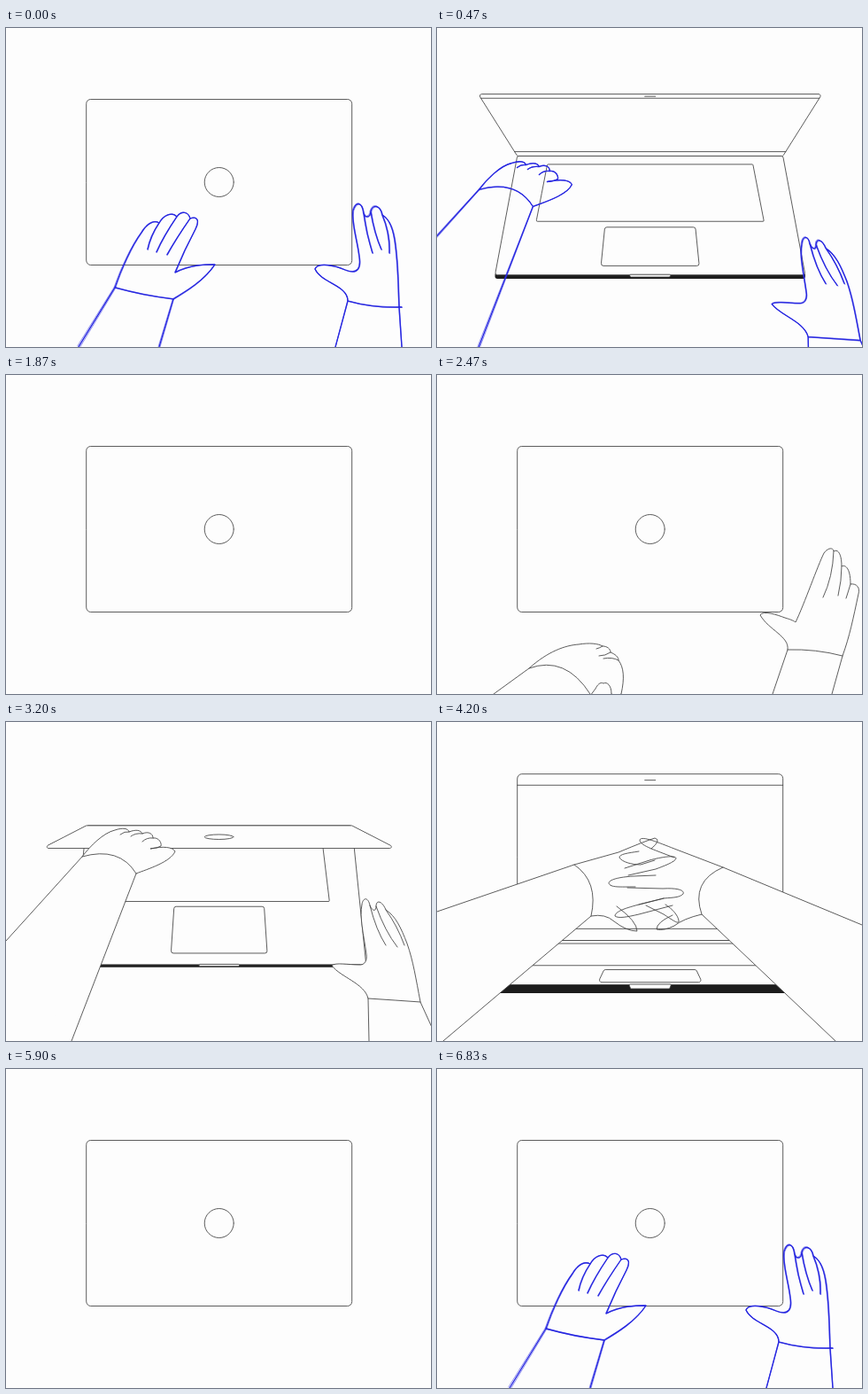
An HTML page with a canvas for the animation above (6860 ms loop, 480x360 px).

```html
<!DOCTYPE html>
<html lang="en">
<head>
<meta charset="utf-8">
<title>Opening a laptop</title>
<style>
  html, body { margin: 0; width: 100%; height: 100%; overflow: hidden; background: #fdfdfd; }
  canvas { display: block; }
</style>
</head>
<body>
<canvas id="stage" width="480" height="360"></canvas>
<script>
const ctx = document.getElementById('stage').getContext('2d');
const LOOP = 6860, CX = 240.7;
const PAPER = '#fdfdfd', LINE = '#404040', BLUE = '#2626e0', PINK = '#f81cf0', PURPLE = '#8a22ba';

// Poses in one group share the same path commands, so their numbers can be blended.
const LEFT = {
  flat: 'M82 360 L123 293 C130 272 142 246 153 231 C160 219 168 217 173 220 C178 211 188 207 193 213 C198 206 206 207 208 215 C216 212 219 217 214 227 L202 251 L191 276 C208 267 225 267 236 267 C224 285 204 297 189 306 L173 360 M173 220 Q163 235 160 250 M193 213 Q178 235 170 253 M208 215 Q192 238 182 256 M123 293 Q155 302 189 306',
  curled: 'M64 360 L104 331 C125 312 145 305 160 304 C172 302 182 303 187 306 C192 306 196 309 196 313 C201 315 205 318 205 322 C211 330 212 342 208 360 L203 362 L197 360 C197 350 192 346 188 348 C184 346 181 350 179 354 L173 362 M187 306 Q184 308 180 309 M196 313 Q190 317 183 317 M205 322 Q198 318 188 320 M104 331 Q145 316 173 360',
  grip: 'M0 247 L86 152 C95 140 110 125 123 122 C132 119 138 120 139 124 C147 121 152 122 154 126 C161 123 166 126 166 131 C173 130 176 137 175 140 L170 142 L163 143 C178 140 188 141 191 146 C186 158 160 166 147 171 L74 360 M139 124 Q134 123 129 127 M154 126 Q146 125 141 129 M166 131 Q159 130 154 135 M86 152 Q128 140 147 171',
  type: 'M0 346 L96 279 C112 264 128 252 138 246 C145 239 155 235 160 237 C165 234 170 233 173 235 C178 232 184 233 186 236 C200 238 207 258 204 264 C200 267 190 262 187 251 L173 283 C182 275 200 274 207 279 C198 298 165 308 146 320 L124 360 M160 237 Q150 243 146 250 M173 235 Q162 243 156 252 M186 236 Q174 246 168 254 M96 279 Q120 300 146 320'
};
const RIGHT = {
  flat: 'M372 360 L386 308 C386 290 356 288 349 272 C352 264 372 268 383 273 C398 279 401 270 399 258 C397 240 390 220 392 206 C395 196 402 195 404 209 C406 215 411 214 412 207 C414 198 423 200 425 211 C434 216 438 228 440 246 C443 270 443 290 444 315 L447 360 M404 209 Q407 232 414 254 M412 207 Q416 232 424 250 M425 211 Q434 232 433 254 M386 308 Q414 316 447 315',
  spread: 'M379 360 L396 310 C398 295 375 288 365 271 C368 265 385 271 393 274 C400 276 404 278 405 279 C415 258 430 215 437 201 C442 194 448 195 448 199 C453 196 457 202 457 216 C460 214 467 216 467 236 C474 235 478 240 476 247 C470 275 466 295 458 317 L446 360 M448 199 Q447 228 436 251 M457 216 Q457 232 453 249 M467 236 Q464 246 462 252 M396 310 Q428 309 458 317',
  grip: 'M410 360 L409 312 C405 295 378 288 368 275 C371 271 388 274 398 274 C406 275 408 268 407 262 C404 240 399 220 402 206 C403 198 409 197 411 207 C414 214 418 214 418 208 C418 200 425 202 429 212 C440 219 446 232 453 250 C460 270 463 290 468 316 L488 360 M411 207 Q418 235 429 252 M418 208 Q428 236 442 254 M429 212 Q442 230 450 252 M409 312 Q440 314 468 316'
};
// Clasped hands: raised and stretched poses of each side, with the body behind the ink.
const CLASP = {
  leftInk: [
    'M0 164 L140 152 L196 138 Q240 119 250 117 Q258 118 240 130 M205 156 L240 144 C258 141 276 139 279 144 C279 150 262 155 250 159 L214 173 M215 186 L262 188 C285 188 292 191 290 195 C287 200 275 201 262 201 L222 210 M222 209 L268 229 C282 235 286 238 283 239 C278 241 262 237 244 231 M140 152 Q146 185 154 223 M0 265 L154 223 Q168 222 176 236 Q184 255 190 255 Q196 248 193 212',
    'M0 214 L155 161 L205 147 Q236 134 246 131 Q254 133 242 143 M212 165 L240 156 C255 152 270 150 270 154 C269 158 255 163 247 166 L216 173 M215 187 L255 188 C272 187 280 190 278 194 C274 198 268 198 256 199 L228 206 M236 207 L256 217 C268 225 274 229 273 224 C272 218 266 211 258 206 M155 161 Q183 180 174 219 M7 360 L174 219 Q190 216 200 225 Q214 236 226 236 Q226 225 203 208'],
  rightInk: [
    'M480 181 L335 153 L268 127 C250 119 229 112 227 117 C226 121 240 128 262 138 M240 131 C215 134 197 136 197 140 C199 144 208 150 222 154 L248 149 M250 172 L214 173 C195 175 180 178 180 182 C181 187 195 187 222 186 M262 201 L230 206 C205 213 190 222 190 229 C192 233 205 231 225 224 L280 209 M335 153 Q328 185 314 222 M480 280 L314 222 Q306 235 300 250 Q294 257 290 251 Q286 240 285 212',
    'M480 229 L323 164 L268 143 C250 136 231 128 229 133 C229 139 242 143 268 153 M228 146 C215 148 206 149 206 153 C209 158 220 161 230 161 L246 156 M247 173 L222 174 C205 175 194 178 194 182 C196 187 206 186 224 186 M256 199 L232 205 C212 210 201 214 201 219 C205 222 215 220 228 217 L266 207 M323 164 Q286 180 299 217 M450 360 L299 217 Q278 222 268 230 Q256 236 248 234 Q248 226 266 218'],
  leftBody: [
    'M0 164 L140 152 L240 118 L240 222 L190 252 L154 223 L0 265 L0 265',
    'M0 214 L155 161 L240 132 L240 222 L215 232 L174 219 L7 360 L0 360'],
  rightBody: [
    'M480 181 L335 153 L240 118 L240 222 L290 252 L314 222 L480 280 L480 280',
    'M480 229 L323 164 L240 132 L240 222 L262 232 L299 217 L450 360 L480 360']
};
const SLEEVES = 'M0 265 L27 360 M480 270 L444 360 M5 252 L160 222 M5 240 L3 256 M95 229 L170 226 M314 222 L470 264 M471 262 L470 275 M335 153 L450 168';

const clamp = x => Math.max(0, Math.min(1, x));
const mix = (a, b, k) => a + (b - a) * k;
const ramp = (t, from, to) => { const k = clamp((t - from) / (to - from)); return k * k * (3 - 2 * k); };

function track(t, keys) {
  if (t <= keys[0][0]) return keys[0][1];
  for (let i = 1; i < keys.length; i++) {
    const [t0, a] = keys[i - 1], [t1, b] = keys[i];
    if (t < t1) return mix(a, b, (t - t0) / (t1 - t0));
  }
  return keys[keys.length - 1][1];
}

function blend(a, b, k) {
  if (k <= 0 || a === b) return a;
  if (k >= 1) return b;
  const target = b.match(/-?[\d.]+/g);
  let i = 0;
  return a.replace(/-?[\d.]+/g, n => mix(+n, +target[i++], k).toFixed(2));
}

function shifted(x, y, draw) {
  ctx.save();
  ctx.translate(x, y);
  draw();
  ctx.restore();
}

// Clean ink is one thin line; sketch ink is several loose passes.
function ink(d, color) {
  const path = new Path2D(d);
  ctx.strokeStyle = color;
  if (color === LINE) { ctx.lineWidth = 0.85; ctx.stroke(path); return; }
  for (let i = -1; i <= 1; i++) {
    ctx.save();
    ctx.translate(CX, 220);
    ctx.rotate(i * 0.004);
    ctx.scale(1 + i * 0.004, 1 - i * 0.003);
    ctx.translate(-CX, -220);
    ctx.lineWidth = i ? 0.5 : 1.3;
    ctx.stroke(path);
    ctx.restore();
  }
}

function fillPath(d) {
  ctx.fillStyle = PAPER;
  ctx.fill(new Path2D(d));
}

function hand(d, color) {
  if (color === LINE) fillPath(d);
  ink(d, color);
}

function shape(points, radius) {
  const last = points[points.length - 1];
  ctx.beginPath();
  ctx.moveTo((last[0] + points[0][0]) / 2, (last[1] + points[0][1]) / 2);
  points.forEach((p, i) => {
    const next = points[(i + 1) % points.length];
    ctx.arcTo(p[0], p[1], next[0], next[1], radius);
  });
  ctx.closePath();
  ctx.fillStyle = PAPER;
  ctx.fill();
  ctx.strokeStyle = LINE;
  ctx.lineWidth = 0.85;
  ctx.stroke();
}

const trapezoid = (y0, half0, y1, half1, radius) =>
  shape([[CX - half0, y0], [CX + half0, y0], [CX + half1, y1], [CX - half1, y1]], radius);

function rule(y, half) {
  ctx.beginPath();
  ctx.moveTo(CX - half, y);
  ctx.lineTo(CX + half, y);
  ctx.strokeStyle = LINE;
  ctx.lineWidth = 0.85;
  ctx.stroke();
}

function drawBase(tilt, hinge) {
  const front = 267.5 + 29 * tilt, half = 150 + 54 * Math.pow(tilt, 0.8);
  const y = u => mix(hinge, front, u), w = u => mix(150, half, u);
  ctx.fillStyle = '#1d1d1d';
  ctx.beginPath();
  ctx.roundRect(CX - half, front - 3 * tilt, half * 2, 1 + 11.5 * tilt, [0, 0, 7 * tilt, 7 * tilt]);
  ctx.fill();
  trapezoid(hinge, 150, front, half, 3 - 2 * tilt);
  const keys = mix(0.54, 0.565, tilt);
  trapezoid(y(0.07), w(0.07) * 0.765, y(keys), w(keys) * 0.785, 1);
  const top = mix(0.56, 0.66, tilt), bottom = mix(0.91, 0.945, tilt), extra = 8 * (1 - tilt);
  trapezoid(y(top), w(top) * 0.28 + extra, y(bottom), w(bottom) * 0.292 + extra, 2.5);
  trapezoid(front - 0.5, 24, front + 1 + 3.5 * tilt, 22, 1);
}

function drawLaptop(t) {
  const tilt = track(t, [[60, 0], [400, 0.217], [730, 1]]);
  const edge = track(t, [[60, 267.5], [250, 225], [400, 143.5], [520, 27], [600, 42], [730, 58.7]]);
  const half = track(t, [[60, 150], [400, 200], [520, 190], [730, 150]]);
  const hinge = 80.5 + 166 * tilt;
  if (tilt > 0) drawBase(tilt, hinge);
  const slant = clamp((half - 150) / 50);
  trapezoid(hinge, 150, edge, half, mix(5, 1.7, slant));
  if (edge > hinge) {
    ctx.beginPath();
    ctx.ellipse(CX, (hinge + edge) / 2, 16.5, 16.5 * Math.pow((edge - hinge) / 187, 0.9), 0, 0, 7);
    ctx.stroke();
  } else {
    for (const u of [0.067, 0.93]) rule(mix(edge, hinge, u), mix(half, 150, u));
    rule(mix(edge, hinge, 0.037), 6);
  }
}

function panel(side, y, grow) {
  if (grow <= 0) return;
  const width = 113.5 * grow, x = side < 0 ? 237 - width : 243;
  ctx.fillStyle = PAPER;
  ctx.strokeStyle = '#8b8b8e';
  ctx.lineWidth = 0.8;
  ctx.beginPath();
  ctx.roundRect(x, y, width, 60.5, 1.5);
  ctx.fill();
  ctx.fillStyle = '#dedfe3';
  ctx.fillRect(x, y, width, 11.5);
  ctx.stroke();
}

function drawScreen(t) {
  const banner = ramp(t, 1800, 1910);
  if (banner <= 0) return;
  ctx.fillStyle = PURPLE;
  ctx.fillRect(91, 71, 299.5, 20.5 * banner);
  ctx.globalAlpha = ramp(t, 1940, 2060);
  ctx.fillStyle = ctx.strokeStyle = '#fff';
  ctx.font = '900 8.6px Inter, Arial, sans-serif';
  ctx.fillText('FOLDREN', 114.5, 82);
  ctx.font = '700 3.6px Inter, Arial, sans-serif';
  ctx.letterSpacing = '1px';
  ctx.fillText('PERUSAL', 115, 86.8);
  ctx.letterSpacing = '0px';
  ctx.lineWidth = 1;
  ctx.beginPath();
  ctx.arc(360, 82, 4.6, 0, 7);
  ctx.stroke();
  ctx.globalAlpha = 1;
  const upper = ramp(t, 2030, 2300), lower = track(t, [[2140, 0], [2250, 0.72], [2330, 0.925], [2420, 1]]);
  for (const side of [-1, 1]) {
    panel(side, 98.5, upper);
    panel(side, 165.5, lower);
  }
}

function drawOpeningHands(t, color) {
  const enter = 1 - ramp(t, -690, -350), settle = ramp(t, -320, -40);
  const lift = track(t, [[0, 0], [60, 0.03], [250, 0.34], [400, 1]]);
  const leave = track(t, [[410, 0], [500, 0.3], [620, 1]]);
  const left = t < 0 ? blend(LEFT.curled, LEFT.flat, settle) : blend(LEFT.flat, LEFT.grip, lift);
  const right = t < 0 ? blend(RIGHT.spread, RIGHT.flat, settle) : blend(RIGHT.flat, RIGHT.grip, lift);
  shifted(60 * enter + 50 * leave, 180 * enter + 180 * leave, () => hand(right, color));
  shifted(-30 * enter - 190 * leave, 70 * enter + 150 * leave, () => hand(left, color));
}

function drawClasp(t, color) {
  const away = 1 - ramp(t, 660, 1100), stretch = ramp(t, 1270, 1390);
  const flex = 2 * ramp(t, 1500, 1530) * (1 - ramp(t, 1600, 1670));
  const part = ramp(t, 1670, 1780);
  const dx = 150 * away + 26 * part, dy = 130 * away + 20 * part + flex;
  const pose = name => blend(CLASP[name][0], CLASP[name][1], stretch);
  const sides = [['right', 1], ['left', -1]];
  if (color === LINE)
    for (const [side, sign] of sides) shifted(sign * dx, dy, () => fillPath(pose(side + 'Body')));
  for (const [side, sign] of sides) shifted(sign * dx, dy, () => ink(pose(side + 'Ink'), color));
  if (color === PINK && stretch < 0.5) shifted(0, dy, () => ink(SLEEVES, color));
}

function drawTyping(t, color) {
  const arrive = 1 - ramp(t, 1750, 1930), beat = t > 1930 ? Math.sin((t - 2330) / 38) : 0;
  for (const sign of [1, -1]) {
    ctx.save();
    if (sign < 0) { ctx.translate(2 * CX, 0); ctx.scale(-1, 1); }
    ctx.translate(26 * arrive, -45 * arrive + sign * beat * 2);
    hand(LEFT.type, color);
    ctx.restore();
  }
}

function draw(now) {
  const clean = now >= 1870 && now < 5900;
  let t = clean ? now - 2800 : now >= 5900 ? now - LOOP : now;
  if (!clean && t > 730) t = Math.min(1730, Math.floor(t / 66) * 66);
  const color = clean ? LINE : t < 690 ? BLUE : PINK;
  ctx.fillStyle = PAPER;
  ctx.fillRect(0, 0, 480, 360);
  ctx.lineCap = ctx.lineJoin = 'round';
  drawLaptop(t);
  if (clean) drawScreen(t);
  if (t > -690 && t < 640) drawOpeningHands(t, color);
  else if (t >= 640 && t < 1760) drawClasp(t, color);
  else if (t >= 1760) drawTyping(t, color);
}

const start = performance.now();
function frame() {
  draw((performance.now() - start) % LOOP);
  requestAnimationFrame(frame);
}
frame();
</script>
</body>
</html>
```
